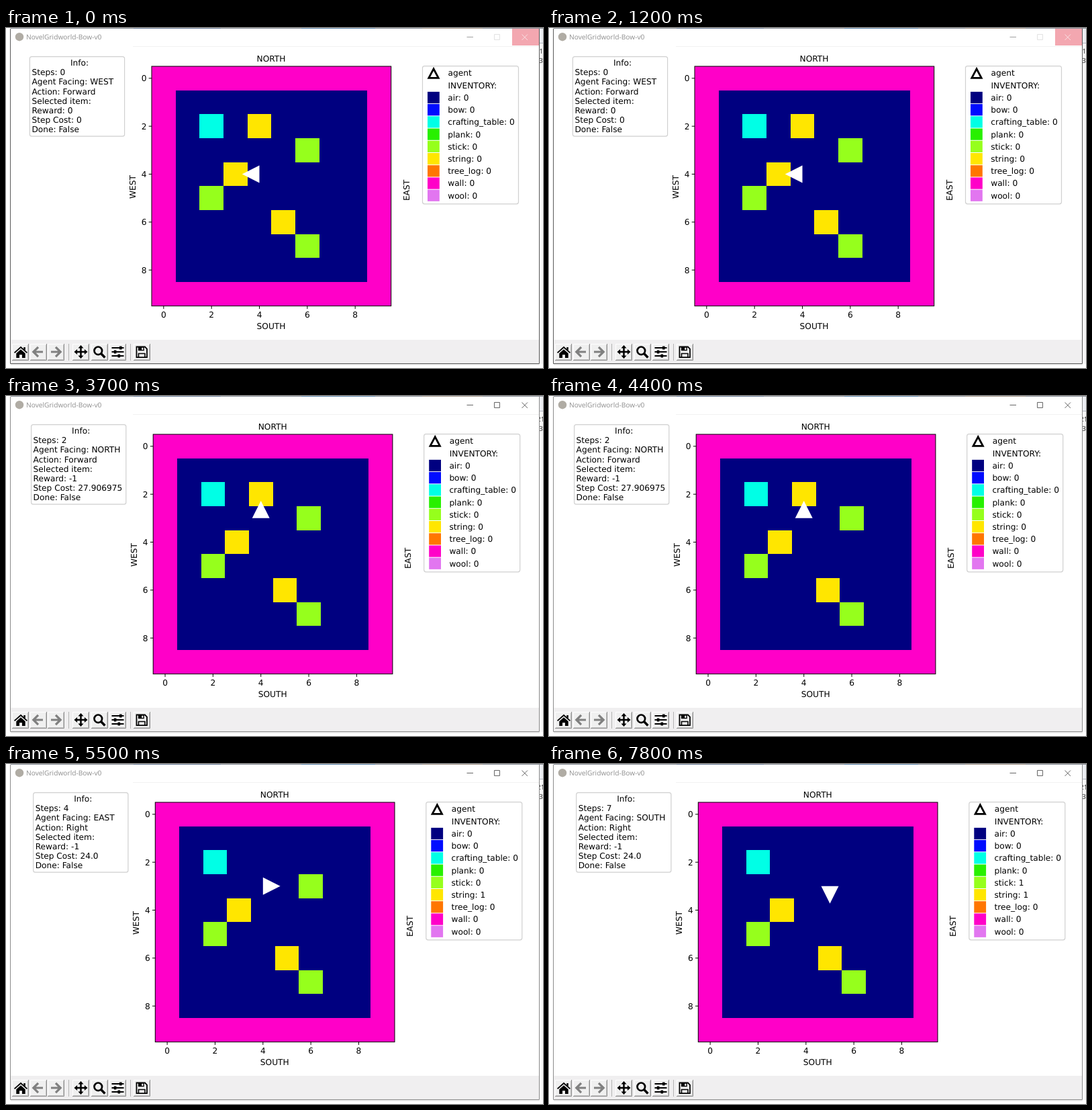
An HTML page for the animation above (8 s loop, 800 by 506 pixels).

```html
<!DOCTYPE html>
<html lang="en">
<head>
<meta charset="utf-8">
<title>NovelGridworld-Bow-v0</title>
<style>
  html, body { margin: 0; width: 100%; height: 100%; overflow: hidden; background: #fff; }
  svg { display: block; width: 800px; height: 506px; }
  text { font: 12.2px "DejaVu Sans", Verdana, sans-serif; fill: #000; text-rendering: geometricPrecision; white-space: pre; }
  .mid { text-anchor: middle; }
  .end { text-anchor: end; }
  .title { font: 10.2px "Open Sans", "Noto Sans", sans-serif; fill: #8e8e8e; }
  .side { font: 10px "Open Sans", "Noto Sans", sans-serif; fill: #222; }
  .line { fill: none; stroke: #000; }
  .crisp { shape-rendering: crispEdges; }
</style>
</head>
<body>
<svg id="stage" viewBox="0 0 800 506" xmlns="http://www.w3.org/2000/svg">
  <rect width="800" height="506" fill="#fff"/>
  <g id="desk"></g>
  <g id="frame"></g>
  <g id="plot"></g>
  <g id="tools"></g>
</svg>
<script>
const LOOP = 8000;
const CELL = 35.67, LEFT = 217, TOP = 57, SIZE = CELL * 10;
const COLORS = {
  air: '#000080', bow: '#000cff', crafting_table: '#00ffe6', plank: '#28f000',
  stick: '#96ff1c', string: '#ffe600', tree_log: '#ff7600', wall: '#ff00c8', wool: '#e276f0'
};
const ITEMS = [
  ['crafting_table', 2, 2], ['string', 4, 2], ['stick', 6, 3], ['string', 3, 4],
  ['stick', 2, 5], ['string', 5, 6], ['stick', 6, 7]
];
const TURN = { NORTH: 0, EAST: 90, SOUTH: 180, WEST: 270 };

// start, shift, column, row, facing, action, reward, cost
const STEPS = [
  [0, 0, 4, 4, 'WEST', 'Forward', 0, '0'],
  [3000, -0.7, 4, 4, 'NORTH', 'Right', -1, '24.0'],
  [3700, 2.2, 4, 3, 'NORTH', 'Forward', -1, '27.906975'],
  [4600, 5.3, 4, 3, 'NORTH', 'Break', 10, '3600.0'],
  [5500, 5.3, 4, 3, 'EAST', 'Right', -1, '24.0'],
  [6000, 5.3, 5, 3, 'EAST', 'Forward', -1, '27.906975'],
  [6800, 5.3, 5, 3, 'EAST', 'Break', 10, '3600.0'],
  [7500, 5.3, 5, 3, 'SOUTH', 'Right', -1, '24.0']
];

const byId = id => document.getElementById(id);
const rect = (x, y, w, h, fill, more = '') =>
  `<rect x="${x}" y="${y}" width="${w}" height="${h}" fill="${fill}" ${more}/>`;
const path = (d, more = '') => `<path d="${d}" ${more}/>`;
const stroke = (d, width, color = '#000') =>
  `<path class="line" d="${d}" style="stroke:${color};stroke-width:${width}"/>`;
const text = (x, y, s, cls = '', more = '') =>
  `<text x="${x}" y="${y}" class="${cls}" ${more}>${s}</text>`;
const panel = (x, y, w, h) =>
  rect(x, y, w, h, '#fff', 'rx="3" stroke="#d0d0d0" stroke-width="1.2"');

function drawGrid(gone) {
  let out = rect(LEFT, TOP, SIZE, SIZE, COLORS.wall, 'class="crisp"') +
    rect(LEFT + CELL, TOP + CELL, CELL * 8, CELL * 8, COLORS.air, 'class="crisp"');
  ITEMS.forEach(([kind, c, r], i) => {
    if (!gone.includes(i))
      out += rect(LEFT + c * CELL, TOP + r * CELL, CELL, CELL, COLORS[kind], 'class="crisp"');
  });
  out += rect(LEFT, TOP, SIZE, SIZE, 'none', 'stroke="#000" stroke-width="1"');
  for (let n = 0; n < 10; n += 2) {
    const mid = (n + 0.5) * CELL, x = LEFT + mid, y = TOP + mid, b = TOP + SIZE;
    out += stroke(`M${x} ${b}v4.3M${LEFT} ${y}h-4.3`, 1) +
      text(x, 431.4, n, 'mid') + text(LEFT - 7.6, y + 4.6, n, 'end');
  }
  return out + text(395, 50, 'NORTH', 'mid') + text(395, 448.4, 'SOUTH', 'mid') +
    text(0, 0, 'WEST', 'mid', 'transform="translate(192.6 236.5) rotate(-90)"') +
    text(0, 0, 'EAST', 'mid', 'transform="translate(601 241.5) rotate(-90)"');
}

function drawAgent(c, r, facing) {
  const x = LEFT + (c + 0.5) * CELL, y = TOP + (r + 0.5) * CELL;
  return path('M0 -25.8L13 0H-13Z',
    `fill="#fff" transform="translate(${x} ${y}) rotate(${TURN[facing]})"`);
}

function drawInfo(n, facing, action, reward, cost) {
  const lines = [`Steps: ${n}`, `Agent Facing: ${facing}`, `Action: ${action}`,
    'Selected item:', `Reward: ${reward}`, `Step Cost: ${cost}`, 'Done: False'];
  return panel(35.4, 42.6, 141.2, 118.6) + text(109.5, 56, 'Info:', 'mid') +
    lines.map((s, i) => text(38.4, 70.2 + i * 14.15, s)).join('');
}

function drawLegend(counts) {
  let out = panel(620.5, 56.6, 143, 205.2) +
    path('M637 60.8L629.8 74.4H644.2Z', 'fill="#fff" stroke="#000" stroke-width="2.8"') +
    text(658.5, 71.4, 'agent') + text(658.5, 89.6, 'INVENTORY:');
  Object.keys(COLORS).forEach((kind, i) => {
    const y = 103.5 + i * 18.22;
    out += rect(628, y - 8.6, 17.8, 17.2, COLORS[kind]) +
      text(658.2, y + 4.4, `${kind}: ${counts[kind] || 0}`);
  });
  return out;
}

function drawPlot(n) {
  const [, shift, c, r, facing, action, reward, cost] = STEPS[n];
  const gone = [], counts = {};
  if (n >= 3) { gone.push(1); counts.string = 1; }
  if (n >= 6) { gone.push(2); counts.stick = 1; }
  byId('plot').setAttribute('transform', `translate(${shift} 0)`);
  byId('plot').innerHTML = drawGrid(gone) + drawAgent(c, r, facing) +
    drawInfo(n, facing, action, reward, cost) + drawLegend(counts);
}

function drawFrame(active) {
  const edge = active ? '#8c8c8c' : '#5a5a5a', ink = active ? '#666' : '#a0a0a0';
  byId('desk').innerHTML =
    rect(7, 0, 793, 1, '#8b9099') + rect(190, 0, 130, 1, '#6d7f99') +
    rect(440, 0, 110, 1, '#5f88ad') + rect(620, 0, 90, 1, '#a3968a') +
    rect(795, 1, 5, 21, '#eceef2') + rect(795, 22, 5, 1, '#b4b8c2') +
    rect(795, 23, 5, 477, '#f7f7f7') + rect(7, 500, 788, 2, '#ececec') +
    text(active ? 791 : 794.5, 38, active ? '21' : '1', 'side') + text(794, 52, '3', 'side');
  byId('frame').innerHTML =
    rect(6, 1, 789, 499, '#fff') +
    rect(189, 27, 605, 1, '#f1f1f1') +
    rect(7, 464, 787, 35, '#f0eff0') +
    stroke('M6.5 1V499.5H794.5V1', 1, edge) +
    '<circle cx="20" cy="13.2" r="6.2" fill="#b0aca4"/>' +
    text(30, 17.2, 'NovelGridworld-Bow-v0', 'title') +
    (active ? '' : rect(754, 1, 40, 25, '#f3a7b0')) +
    stroke('M686.5 13.5H696', 1, ink) +
    stroke('M727.5 9.5H735.5V17.5H727.5Z', 1, active ? ink : '#e2e2e2') +
    stroke('M768.5 9.5L777 18M777 9.5L768.5 18', 1, active ? ink : '#f9dfe2');
}

function drawTools() {
  const button = x => rect(x, 470, 25, 25, '#f0f0f0') +
    stroke(`M${x + 0.5} 494.5V470.5H${x + 24.5}`, 1, '#fff') +
    stroke(`M${x + 24.5} 470V494.5H${x}`, 1, '#8f8f8f') +
    stroke(`M${x + 23.5} 471.5V493.5H${x + 1}`, 1, '#c4c4c4');
  const arrow = (x, dir) =>
    stroke(`M${x - 7 * dir} 482H${x + 7 * dir}M${x} 474.8L${x - 7.2 * dir} 482L${x} 489.2`, 3.2, '#808080');
  const heads = [0, 90, 180, 270].map(a =>
    path('M0 -10L4 -5.4H-4Z', `transform="translate(111.5 482) rotate(${a})"`)).join('');

  byId('tools').innerHTML =
    [9, 36, 62, 99, 127, 154, 190].map(button).join('') +
    stroke('M93.5 470V495M185.5 470V495', 1, '#b4b4b4') +
    stroke('M12.6 483.4L22 475L31.4 483.4', 1.9) +
    path('M15.3 484.2L22 478.2L28.7 484.2V491H24V486.2H20V491H15.3ZM26.3 475H28.8V480L26.3 477.8Z') +
    arrow(48, 1) + arrow(74, -1) +
    stroke('M111.5 474V490M103.5 482H119.5', 2.5) + heads +
    '<circle cx="137.3" cy="480.3" r="5.8" fill="none" stroke="#000" stroke-width="2.7"/>' +
    stroke('M141.6 484.6L147.4 490.4', 3.5) +
    stroke('M157.5 476H175.5M157.5 482H175.5M157.5 488H175.5', 1.8) +
    rect(169, 473.6, 3.6, 4.8, '#000') + rect(160.8, 479.6, 3.6, 4.8, '#000') +
    rect(166.5, 485.6, 3.6, 4.8, '#000') +
    stroke('M194.5 474.5H207L210 477.5V490.2H194.5Z', 1.8) +
    stroke('M197.5 490V484.5H207V490', 1.6) +
    path('M197 474H205.8V480.3H197ZM202.2 475.4V479H204.4V475.4Z', 'fill-rule="evenodd"');
}

let shown = -1;
function tick() {
  const t = performance.now() % LOOP;
  let n = STEPS.length - 1;
  while (STEPS[n][0] > t) n--;
  if (n !== shown) {
    shown = n;
    drawFrame(n > 0);
    drawPlot(n);
  }
  requestAnimationFrame(tick);
}

drawTools();
tick();
</script>
</body>
</html>
```
